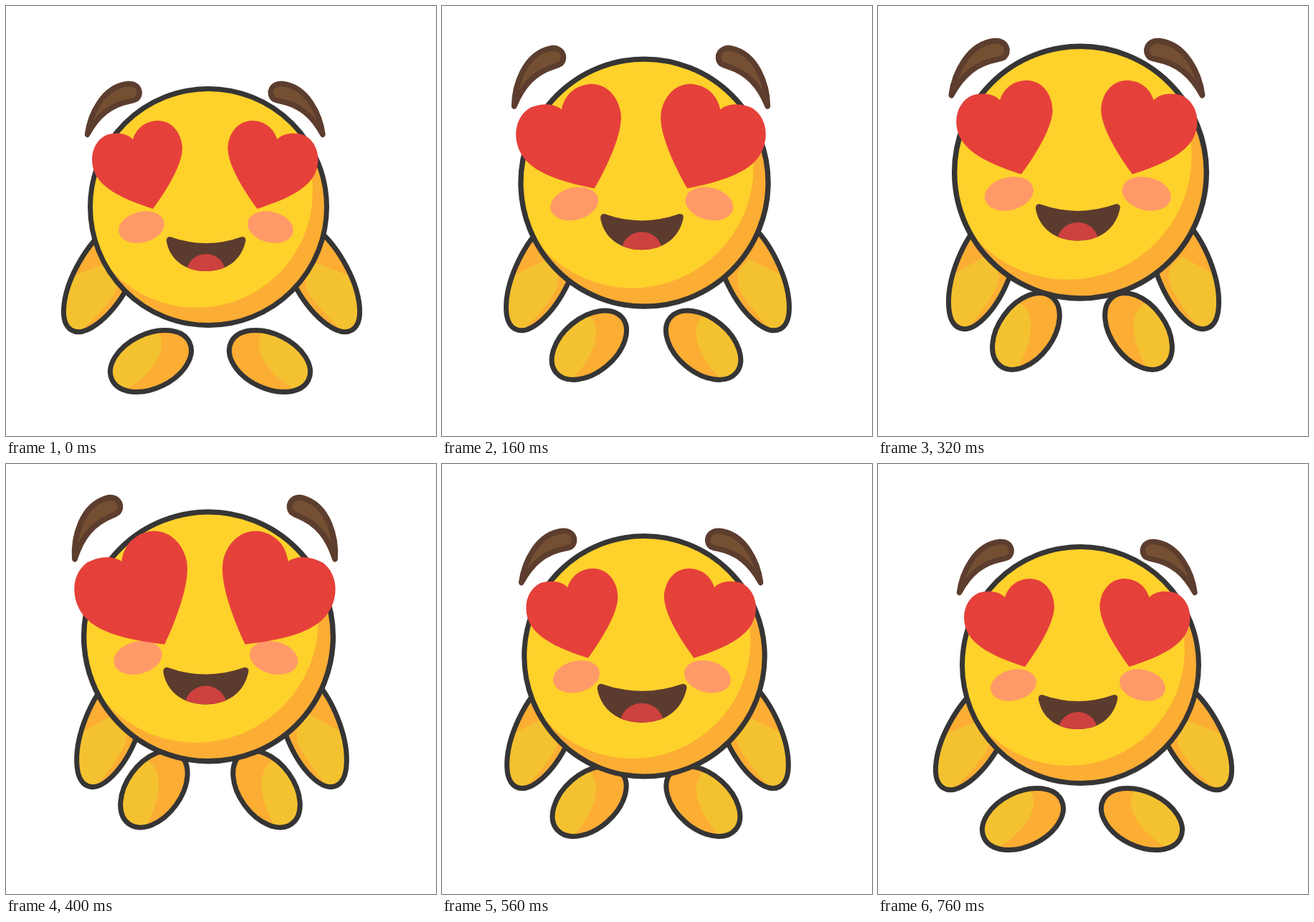
An HTML page without scripts that plays this animation: 600 px wide and 600 px high, repeating every 800 ms.

```html
<!DOCTYPE html>
<html lang="en">
<head>
<meta charset="utf-8">
<title>Lovestruck smiley</title>
<style>
  @property --f { syntax: "<number>"; inherits: true; initial-value: 0; }

  html, body { margin: 0; width: 100%; height: 100%; overflow: hidden; background: #fff; }
  svg { display: block; width: 100%; height: 100%; animation: tick 800ms steps(20, end) -4ms infinite; }
  @keyframes tick { from { --f: 0; } to { --f: 20; } }

  /* Every pose is derived from the tick counter. */
  .rig {
    --before: max(0, 1 - var(--f) / 9);
    --after: min(1, max(0, (var(--f) - 9) / 10));
    --lift: calc((1 - var(--before)) * (1 - var(--after)));
    --rise: calc((1 - var(--before) * var(--before)) * (1 - var(--after)) * (1 - var(--after)));
    --beat: calc(
      1.5 * max(0, min(var(--f) / 3, (5.4 - var(--f)) / 2.4)) +
      1.5 * max(0, min((var(--f) - 8) / 2, (12 - var(--f)) / 2)) +
      .95 * max(0, min((var(--f) - 14) / 3, (19 - var(--f)) / 2)));
    --grin: calc(.11 * (
      max(0, min(var(--f) / 2, (4 - var(--f)) / 2)) +
      max(0, min((var(--f) - 9) / 5, (19 - var(--f)) / 5))));
  }

  .head {
    transform-origin: 282.5px 280.5px;
    transform: translateY(calc(var(--rise) * -49px)) scale(calc(1 + var(--rise) * .0665));
  }
  .arm {
    transform: translate(calc(135.4px + var(--lift) * 12.7px), calc(376px - var(--lift) * 9.3px))
      rotate(calc(30deg - var(--lift) * 9deg));
  }
  /* The feet swing inwards along a slight arc. */
  .foot {
    transform: translate(
        calc(202px + var(--lift) * (10px - var(--lift) * 5.6px)),
        calc(495.5px - var(--lift) * (53.5px - var(--lift) * 7.6px)))
      rotate(calc(-25.8deg - var(--lift) * 31.5deg));
  }
  .heart {
    fill: #e5413a;
    transform-origin: 184px 219.5px;
    transform: rotate(calc(var(--beat) * -7.5deg)) scale(calc(1 + var(--beat) * .15));
  }
  .brow {
    fill: #744f31; stroke: #5c3d2e; stroke-width: 7.5; stroke-linejoin: round;
    transform-origin: 128px 222px;
    transform: translateY(calc(var(--beat) * -3.5px)) rotate(calc(var(--beat) * -7.5deg));
  }
  .mouth {
    transform-origin: 279px 356px;
    transform: scale(calc(1 + var(--grin)));
  }

  .shade { fill: #fcad33; }
  .limb { fill: #f4c230; }
  .skin { fill: #ffd12b; }
  .line { fill: none; stroke: #363535; stroke-width: 7; }
  .cheek { fill: #ff9a68; }
</style>
</head>
<body>
<svg viewBox="0 0 600 600">
  <defs>
    <clipPath id="armClip"><ellipse rx="38" ry="88"/></clipPath>
    <clipPath id="footClip"><ellipse rx="60" ry="38"/></clipPath>
    <clipPath id="bodyClip"><circle cx="282.5" cy="280.5" r="165"/></clipPath>
    <path id="lips" d="M229 322Q279 340 329 322Q336 322 334 329C328 356 306 370 279 370C251 370 229 355 224 329Q223 322 229 322Z"/>
    <clipPath id="lipsClip"><use href="#lips"/></clipPath>

    <g id="limbs">
      <g class="arm">
        <ellipse class="shade" rx="38" ry="88"/>
        <path class="limb" clip-path="url(#armClip)" d="M-40 27L-4-18Q30-12 26 22Q21 60 8 90H-40Z"/>
        <ellipse class="line" rx="38" ry="88"/>
      </g>
    </g>
    <g id="step">
      <g class="foot">
        <ellipse class="shade" rx="60" ry="38"/>
        <path class="limb" clip-path="url(#footClip)" d="M27-45V-30C30-5-5 18-52 21H-70V-45Z"/>
        <ellipse class="line" rx="60" ry="38"/>
      </g>
    </g>
    <g id="eye">
      <path class="brow" d="M113.5 179.5C117 152 135 112 170 108.5C185 107 191 122 182 130Q178 132 172 133C146 138 128 153 113.5 179.5Z"/>
      <path class="heart" d="M177 186C183 168 197 160 213 160C234 161 246 180 246 200C245 224 222 260 205 283C178 274 140 261 126 237C115 218 119 190 140 180C154 176 168 177 177 186Z"/>
    </g>
    <ellipse id="cheek" class="cheek" rx="32.5" ry="21.5" transform="translate(189 308.5) rotate(-14)"/>
  </defs>

  <g class="rig">
    <use href="#limbs"/>
    <use href="#limbs" transform="matrix(-1 0 0 1 574 0)"/>
    <use href="#step"/>
    <use href="#step" transform="matrix(-1 0 0 1 570 0)"/>

    <g class="head">
      <circle class="shade" cx="282.5" cy="280.5" r="165"/>
      <circle class="skin" cx="266" cy="259" r="162" clip-path="url(#bodyClip)"/>
      <circle class="line" cx="282.5" cy="280.5" r="165"/>
      <use href="#cheek"/>
      <use href="#cheek" transform="matrix(-1 0 0 1 558 0)"/>
      <use href="#eye"/>
      <use href="#eye" transform="matrix(-1 0 0 1 555.5 0)"/>
      <g class="mouth">
        <use href="#lips" fill="#5c3b2f"/>
        <ellipse cx="279" cy="372" rx="27" ry="26" fill="#cd413e" clip-path="url(#lipsClip)"/>
      </g>
    </g>
  </g>
</svg>
</body>
</html>
```
